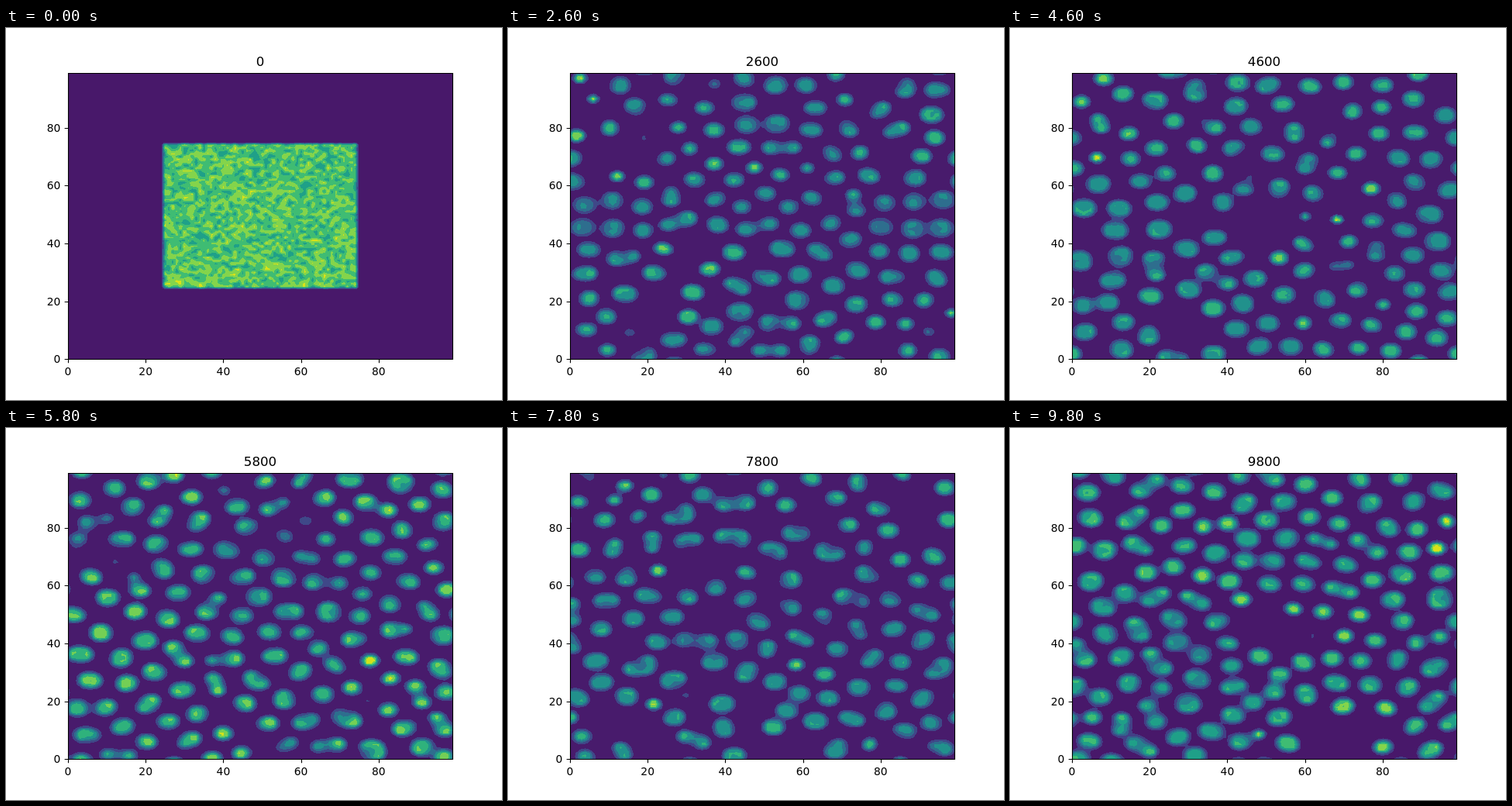
Animation, 640 px wide and 480 px high, one loop 10 s. Source, as an HTML page with a canvas:

```html
<!DOCTYPE html>
<html lang="en">
<head>
<meta charset="utf-8">
<title>Reaction diffusion</title>
<style>
  html, body { margin: 0; width: 100%; height: 100%; overflow: hidden; background: #fff; }
  canvas, svg { position: absolute; left: 0; top: 0; display: block; }
  text { font-family: "DejaVu Sans", sans-serif; font-size: 13.889px; fill: #000; }
  #title { font-size: 16.667px; }
  path { fill: none; stroke: #000; stroke-width: 1.11; }
</style>
</head>
<body>
<canvas id="plot" width="640" height="480"></canvas>
<svg id="axes" width="640" height="480" viewBox="0 0 640 480">
  <text id="title" x="328" y="49" text-anchor="middle">0</text>
</svg>
<script>
const N = 100, SIZE = N * N;
const HOLD = 200, FRAMES = 50, STEPS = 200;
const DU = 0.06, DV = 0.03, FEED = 0.018, KILL = 0.055;
const BOX = { left: 80, top: 57.6, width: 496, height: 369.6 };
const BOTTOM = BOX.top + BOX.height;

// Viridis at even steps from 0 to 1
const VIRIDIS = ['440154', '48186a', '472d7b', '424086', '3b528b', '33638d', '2c728e', '26828e',
  '21918c', '1fa088', '28ae80', '3fbc73', '5ec962', '84d44b', 'addc30', 'd8e219', 'fde725']
  .map(h => [0, 2, 4].map(i => parseInt(h.slice(i, i + 2), 16)));

function viridis(x) {
  const p = x * (VIRIDIS.length - 1), i = Math.min(Math.floor(p), VIRIDIS.length - 2);
  return VIRIDIS[i].map((c, k) => Math.round(c + (VIRIDIS[i + 1][k] - c) * (p - i)));
}

function seeded(seed) {
  return () => {
    seed = (seed + 0x6d2b79f5) | 0;
    let t = Math.imul(seed ^ (seed >>> 15), 1 | seed);
    t = (t + Math.imul(t ^ (t >>> 7), 61 | t)) ^ t;
    return ((t ^ (t >>> 14)) >>> 0) / 4294967296;
  };
}

// Gray-Scott model on a periodic grid, started from a noisy square
let u = new Float64Array(SIZE).fill(1), v = new Float64Array(SIZE);
let u2 = new Float64Array(SIZE), v2 = new Float64Array(SIZE);
const random = seeded(7);
for (let y = 25; y < 75; y++) {
  for (let x = 25; x < 75; x++) {
    u[y * N + x] = 0.5 + 0.19 * random();
    v[y * N + x] = 0.25 + 0.19 * random();
  }
}

function step() {
  for (let y = 0; y < N; y++) {
    const row = y * N, up = ((y + 1) % N) * N, down = ((y + N - 1) % N) * N;
    for (let x = 0; x < N; x++) {
      const i = row + x, a = up + x, b = down + x;
      const l = x ? i - 1 : row + N - 1, r = x < N - 1 ? i + 1 : row;
      const ui = u[i], vi = v[i], uvv = ui * vi * vi;
      u2[i] = ui + DU * (u[l] + u[r] + u[a] + u[b] - 4 * ui) - uvv + FEED * (1 - ui);
      v2[i] = vi + DV * (v[l] + v[r] + v[a] + v[b] - 4 * vi) + uvv - (FEED + KILL) * vi;
    }
  }
  [u, u2] = [u2, u];
  [v, v2] = [v2, v];
}

const states = [Float32Array.from(v)];
function stateAt(n) {
  while (states.length <= n) {
    for (let i = 0; i < STEPS; i++) step();
    states.push(Float32Array.from(v));
  }
  return states[n];
}

// Round contour spacing, at most eight bands
function spacing(max) {
  const raw = max / 8, scale = 10 ** Math.floor(Math.log10(raw));
  return scale * [1, 1.5, 2, 2.5, 3, 4, 5, 6, 8, 10].find(s => s * scale >= raw - 1e-9);
}

const ctx = document.getElementById('plot').getContext('2d');
const W = BOX.width, H = 370, TOP = 58;
const image = ctx.createImageData(W, H);

function drawField(f) {
  const max = f.reduce((m, x) => Math.max(m, x), 1e-9);
  const gap = spacing(max), bands = Math.max(1, Math.ceil(max / gap - 1e-6));
  const colors = Array.from({ length: bands }, (_, k) => viridis((k + 0.5) / bands));
  const d = image.data;
  let p = 0;
  for (let j = 0; j < H; j++) {
    const gy = Math.max(0, (BOTTOM - TOP - j - 0.5) / BOX.height * (N - 1));
    const y = Math.min(Math.floor(gy), N - 2), ty = gy - y;
    for (let i = 0; i < W; i++) {
      const gx = (i + 0.5) / W * (N - 1);
      const x = Math.min(Math.floor(gx), N - 2), tx = gx - x, q = y * N + x;
      const lo = f[q] + (f[q + 1] - f[q]) * tx;
      const hi = f[q + N] + (f[q + N + 1] - f[q + N]) * tx;
      const c = colors[Math.min(bands - 1, Math.floor((lo + (hi - lo) * ty) / gap))];
      d[p++] = c[0];
      d[p++] = c[1];
      d[p++] = c[2];
      d[p++] = 255;
    }
  }
  ctx.putImageData(image, BOX.left, TOP);
}

const svg = document.getElementById('axes');
const title = document.getElementById('title');

function add(tag, attrs, text = '') {
  const el = document.createElementNS(svg.namespaceURI, tag);
  for (const k in attrs) el.setAttribute(k, attrs[k]);
  el.textContent = text;
  svg.append(el);
}

function drawAxes() {
  const snap = x => Math.floor(x + 0.5) + 0.5;
  let d = 'M80.5 58.5H576.5V427.5H80.5Z';
  for (let n = 0; n < N; n += 20) {
    const x = BOX.left + n / (N - 1) * BOX.width;
    const y = BOTTOM - n / (N - 1) * BOX.height;
    d += `M${snap(x)} 427.5v4.86M80.5 ${snap(y)}h-4.86`;
    add('text', { x, y: 448, 'text-anchor': 'middle' }, n);
    add('text', { x: 70.3, y: Math.round(y + 5.2), 'text-anchor': 'end' }, n);
  }
  add('path', { d });
}

let shown = -1;
function render(ms) {
  const n = Math.floor(ms / HOLD) % FRAMES;
  if (n === shown) return;
  shown = n;
  drawField(stateAt(n));
  title.textContent = n * STEPS;
}

drawAxes();
const start = performance.now();
function tick() {
  render(performance.now() - start);
  requestAnimationFrame(tick);
}
tick();
</script>
</body>
</html>
```
